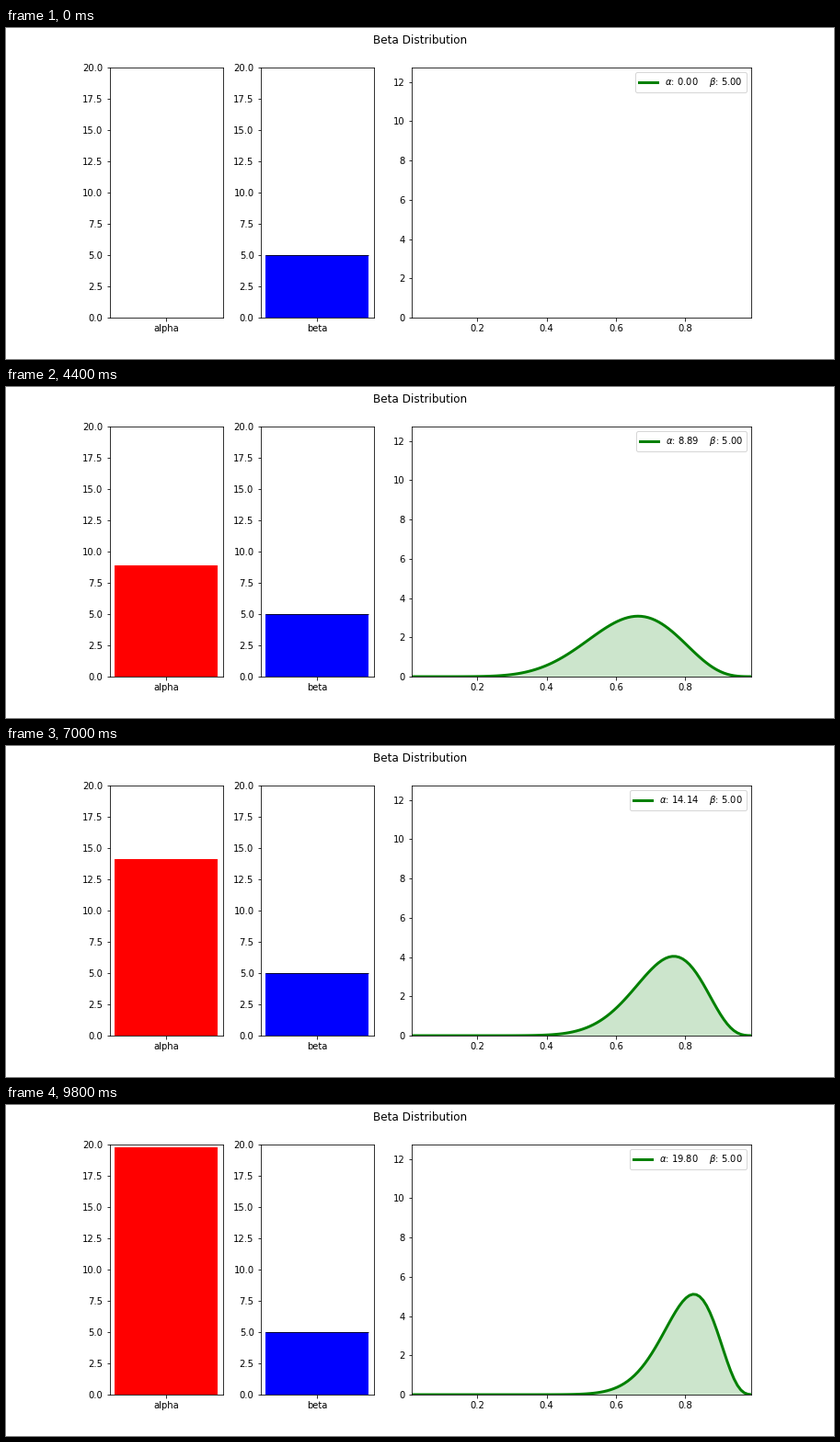
Write a matplotlib script that moves like this. It is 900 by 360 pixels and loops after 10000 ms.

```python
import math

import numpy as np
import matplotlib.pyplot as plt
from matplotlib.animation import FuncAnimation

FRAMES = 50
INTERVAL = 200
BETA = 5.0
TOP = 20

plt.rcParams["font.family"] = "DejaVu Sans"

x = np.linspace(0.01, 0.99, 100)
alphas = np.linspace(0, TOP, 100)[::2]


def beta_pdf(a, b):
    if a <= 0:
        return np.full_like(x, np.nan)
    log_norm = math.lgamma(a + b) - math.lgamma(a) - math.lgamma(b)
    return np.exp(log_norm + (a - 1) * np.log(x) + (b - 1) * np.log(1 - x))


def label(a):
    return rf"$\alpha$: {a:.2f}    $\beta$: {BETA:.2f}"


def add_bar(ax, name, height, color):
    bar = ax.bar([name], [height], color=color)[0]
    ax.set_ylim(0, TOP)
    return bar


fig, (ax_a, ax_b, ax_pdf) = plt.subplots(
    1, 3, figsize=(12.5, 5), dpi=72,
    gridspec_kw=dict(width_ratios=[1, 1, 3], left=0.125, right=0.9,
                     bottom=0.125, top=0.88, wspace=0.2))
fig.suptitle("Beta Distribution", fontsize=12)

bar_a = add_bar(ax_a, "alpha", 0, "red")
bar_b = add_bar(ax_b, "beta", BETA, "blue")
ax_b.plot([-0.4, 0.4], [BETA, BETA], color="black", lw=0.8,
          solid_capstyle="butt")

curve, = ax_pdf.plot([], [], color="green", lw=3, label=label(0))
fill = ax_pdf.fill_between(x, 0, 0, color="green", alpha=0.2, lw=0)
ax_pdf.set_xlim(x[0], x[-1])
ax_pdf.set_ylim(0, max(beta_pdf(a, BETA).max() for a in alphas[1:]))
legend = ax_pdf.legend(loc="upper right")


def update(i):
    a = alphas[i]
    y = beta_pdf(a, BETA)
    bar_a.set_height(a)
    curve.set_data(x, y)
    outline = np.column_stack([x, np.nan_to_num(y)])
    fill.set_verts([np.vstack([[x[0], 0], outline, [x[-1], 0]])])
    legend.get_texts()[0].set_text(label(a))
    return bar_a, curve, fill, legend


anim = FuncAnimation(fig, update, frames=FRAMES, interval=INTERVAL,
                     init_func=lambda: update(0), repeat=True,
                     repeat_delay=0, blit=False)
plt.show()
```
